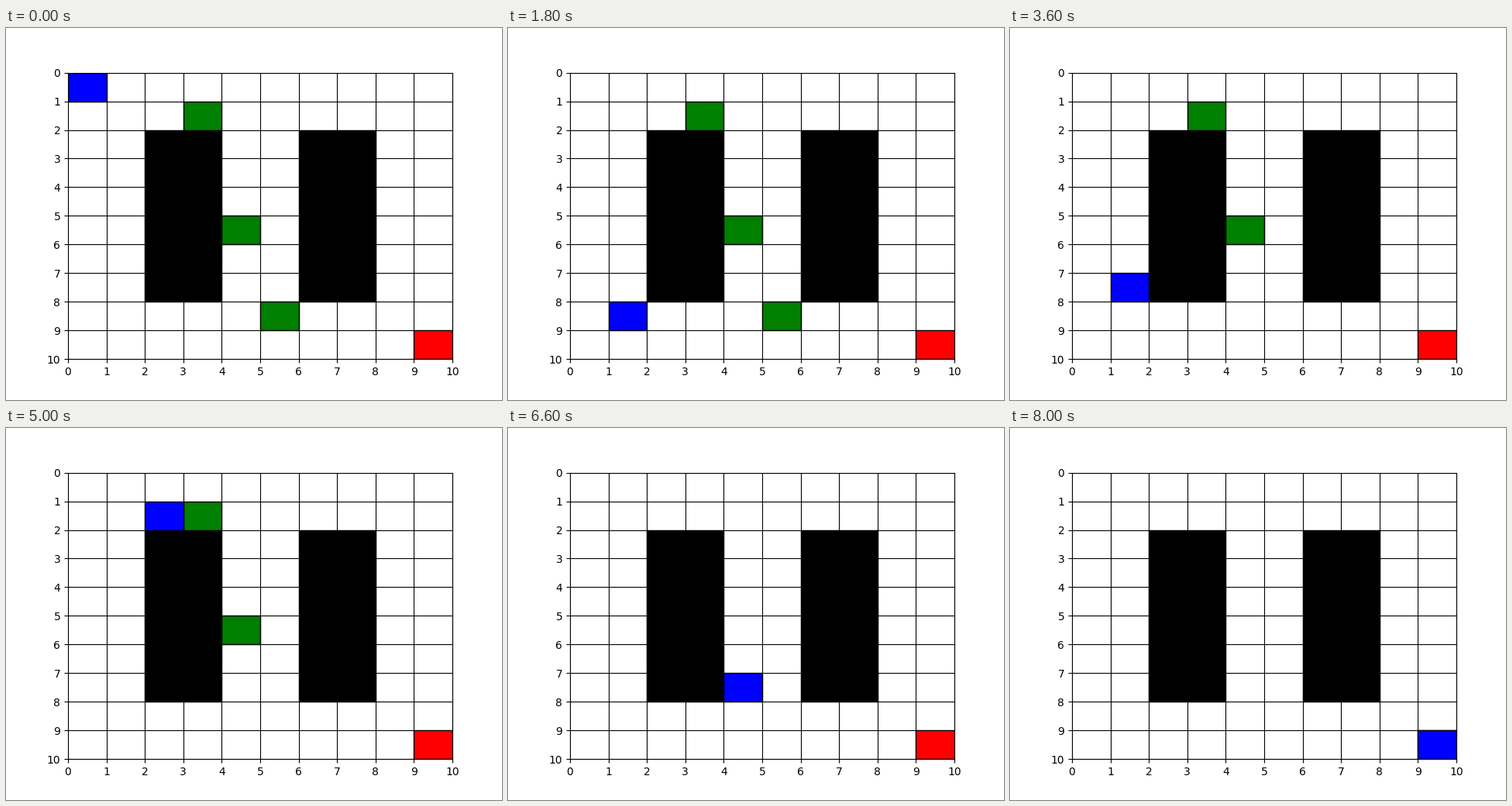
Recreate the animation shown at these times as a matplotlib script. Size 640 by 480 pixels, loop 8.2 s.

```python
import matplotlib.pyplot as plt
from matplotlib.animation import FuncAnimation
from matplotlib.patches import Rectangle

SIZE = 10
STEP_MS = 200
WALLS = [(col, row) for col in (2, 3, 6, 7) for row in range(2, 8)]
STOPS = [(3, 1), (4, 5), (5, 8)]
GOAL = (9, 9)
CORNERS = [(0, 0), (0, 2), (1, 2), (1, 8), (5, 8),
           (1, 8), (1, 1), (4, 1), (4, 9), GOAL]


def walk(corners):
    """List every cell on the way from corner to corner."""
    cells = [corners[0]]
    for (x0, y0), (x1, y1) in zip(corners, corners[1:]):
        n = abs(x1 - x0) + abs(y1 - y0)
        dx, dy = (x1 - x0) // n, (y1 - y0) // n
        cells += [(x0 + dx * i, y0 + dy * i) for i in range(1, n + 1)]
    return cells


path = walk(CORNERS)

fig, ax = plt.subplots(figsize=(6.4, 4.8), dpi=100)
ax.set_xlim(0, SIZE)
ax.set_ylim(SIZE, 0)
ax.set_xticks(range(SIZE + 1))
ax.set_yticks(range(SIZE + 1))
ax.grid(True, color="black", linewidth=0.8)


def add_cell(cell, color):
    return ax.add_patch(Rectangle(cell, 1, 1, facecolor=color,
                                  edgecolor="black", linewidth=1))


for wall in WALLS:
    add_cell(wall, "black")
stops = [(add_cell(cell, "green"), path.index(cell)) for cell in STOPS]
add_cell(GOAL, "red")
agent = add_cell(path[0], "blue")


def update(step):
    agent.set_xy(path[step])
    for patch, reached in stops:
        patch.set_visible(step < reached)
    return [agent] + [patch for patch, _ in stops]


anim = FuncAnimation(fig, update, frames=len(path), interval=STEP_MS,
                     repeat=True, repeat_delay=0, blit=False)
plt.show()
```
